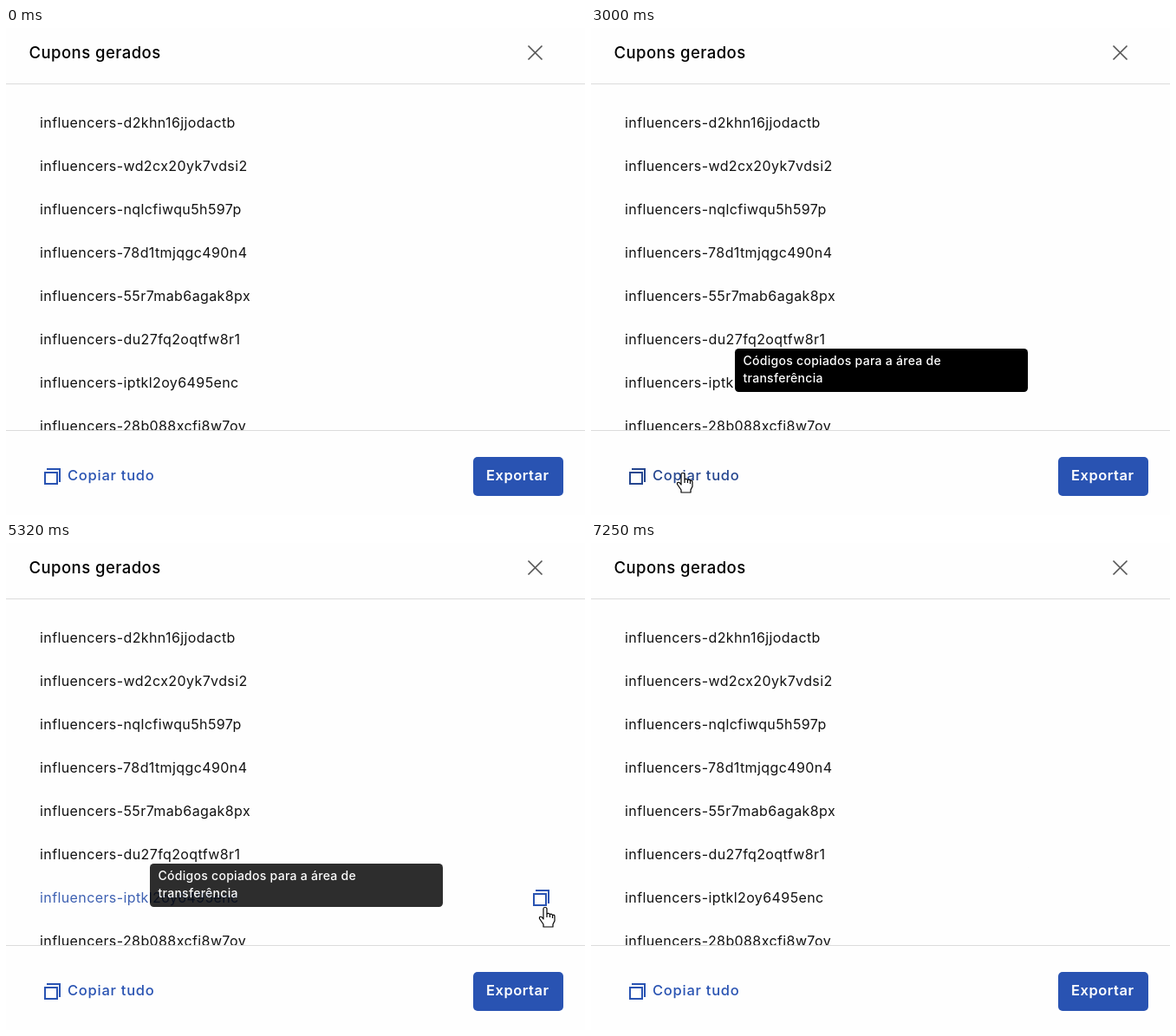
Animation of 668 by 562 pixels, one loop 7780 ms. Source, as an HTML page:

```html
<!DOCTYPE html>
<html lang="pt">
<head>
<meta charset="utf-8">
<title>Cupons gerados</title>
<style>
  html, body { margin: 0; width: 100%; height: 100%; overflow: hidden; background: #fefefe; }
  svg { display: block; width: 668px; height: 562px; }
  text { font: 400 16px Inter, "Open Sans", sans-serif; letter-spacing: .4px; fill: #111; }
  .title { font-size: 18.5px; font-weight: 550; letter-spacing: .45px; fill: #000; }
  .action { font-size: 16.5px; font-weight: 500; letter-spacing: .75px; fill: currentColor; }
  .export { font-size: 16.5px; font-weight: 600; letter-spacing: .5px; fill: #fff; }
  #tooltip text { font-size: 14px; font-weight: 500; letter-spacing: .28px; fill: #fff; }
  .icon { fill: none; stroke: currentColor; stroke-width: 2; }
  .rule { stroke: #dcdcdc; }
  .row { color: #2953b2; }
  .row .icon { visibility: hidden; }
  .row.hover .icon { visibility: visible; }
  .row.hover text { fill: #3e61b2; }
  #copy { color: #2953b2; }
  #copy.hover { color: #25468f; }
  #export rect { fill: #2953b2; }
  #export.hover rect { fill: #213f8a; }
  #cursor path { fill: #fff; stroke: #000; stroke-width: 1.2; stroke-linejoin: round; }
</style>
</head>
<body>
<svg viewBox="0 0 668 562">
  <defs>
    <path id="copyIcon" d="M1 5H15V18H1ZM3 1H18V16"/>
    <clipPath id="listArea"><rect y="65" width="668" height="399"/></clipPath>
  </defs>

  <text class="title" x="26.5" y="35">Cupons gerados</text>
  <path d="M602.5 20.5L618.5 36.5M618.5 20.5L602.5 36.5" stroke="#555" stroke-width="1.7"/>
  <path class="rule" d="M0 64.5H668M0 464.5H668"/>

  <g id="list" clip-path="url(#listArea)"></g>

  <g id="copy">
    <use class="icon" href="#copyIcon" x="44" y="508"/>
    <text class="action" x="71" y="522">Copiar tudo</text>
  </g>
  <g id="export">
    <rect x="539" y="495" width="104" height="45" rx="5"/>
    <text class="export" x="554" y="522">Exportar</text>
  </g>

  <g id="tooltip">
    <rect x="166" y="370" width="338" height="50" rx="4.5"/>
    <text x="175.5" y="389">Códigos copiados para a área de</text>
    <text x="175.5" y="409">transferência</text>
  </g>

  <g id="cursor">
    <path id="arrow" d="M0 0V16L4 12.5L6.5 18.5L9 17.5L6.5 11.5H11.5Z"/>
    <path id="hand" d="M-2 1Q-2 -.5 0 -.5Q2 -.5 2 1V7Q4 5.5 5.5 7.5Q7.5 6.5 8.5 8.5Q11 7.5 11 10V15L9 19V22H-2V19L-6.5 12.5Q-7 9.5 -4 10.5L-2 13ZM-2 1V13M2 7V11M5.5 8V11M8.5 9V12"/>
  </g>
</svg>
<script>
const LOOP = 7780;
const FIRST_ROW = 109, ROW_HEIGHT = 50;
const codes = ["d2khn16jjodactb", "wd2cx20yk7vdsi2", "nqlcfiwqu5h597p", "78d1tmjqgc490n4",
  "55r7mab6agak8px", "du27fq2oqtfw8r1", "iptkl2oy6495enc", "28b088xcfj8w7ov"];

// Pointer stops: time, x, y
const stops = [
  [1660, 118, 562], [2370, 106, 514], [4130, 106, 514], [4860, 345, 249],
  [4920, 345, 249], [5320, 622, 421], [5380, 622, 424], [5690, 616, 509],
  [6940, 616, 509], [7250, 606, 566]
];

const byId = id => document.getElementById(id);
const list = byId("list"), copy = byId("copy"), exportButton = byId("export");
const tooltip = byId("tooltip"), cursor = byId("cursor");
const arrow = byId("arrow"), hand = byId("hand");

list.innerHTML = codes.map((code, i) => {
  const y = FIRST_ROW + i * ROW_HEIGHT;
  return `<g class="row"><text x="39" y="${y + 6}">influencers-${code}</text>
    <use class="icon" href="#copyIcon" x="608" y="${y - 9}"/></g>`;
}).join("");
const rows = [...list.children];

const clamp = v => Math.min(1, Math.max(0, v));
const ramp = (t, from, to) => clamp((t - from) / (to - from));
const smooth = v => v * v * (3 - 2 * v);
const inside = (p, left, top, right, bottom) =>
  Boolean(p) && p.x >= left && p.x <= right && p.y >= top && p.y < bottom;
const show = (el, on) => el.style.display = on ? "" : "none";

function pointerAt(t) {
  const next = stops.findIndex(stop => stop[0] > t);
  if (next < 1) return null;
  const [t0, x0, y0] = stops[next - 1], [t1, x1, y1] = stops[next];
  const k = smooth(ramp(t, t0, t1));
  return { x: x0 + (x1 - x0) * k, y: y0 + (y1 - y0) * k };
}

function draw(t) {
  const pointer = pointerAt(t);
  let linked = false;
  const hover = (el, on) => {
    el.classList.toggle("hover", on);
    linked ||= on;
  };

  rows.forEach((row, i) => {
    const top = FIRST_ROW - 25 + i * ROW_HEIGHT;
    hover(row, inside(pointer, 26, top, 642, Math.min(464, top + ROW_HEIGHT)));
  });
  hover(copy, inside(pointer, 36, 496, 180, 539));
  hover(exportButton, inside(pointer, 539, 495, 643, 540));

  tooltip.style.opacity = smooth(ramp(t, 2740, 3000)) * (1 - ramp(t, 5250, 5640));

  show(cursor, pointer);
  if (pointer) {
    cursor.setAttribute("transform", `translate(${Math.round(pointer.x)} ${Math.round(pointer.y)})`);
    show(hand, linked);
    show(arrow, !linked);
  }
}

const start = performance.now();
function tick() {
  draw((performance.now() - start) % LOOP);
  requestAnimationFrame(tick);
}
tick();
</script>
</body>
</html>
```
